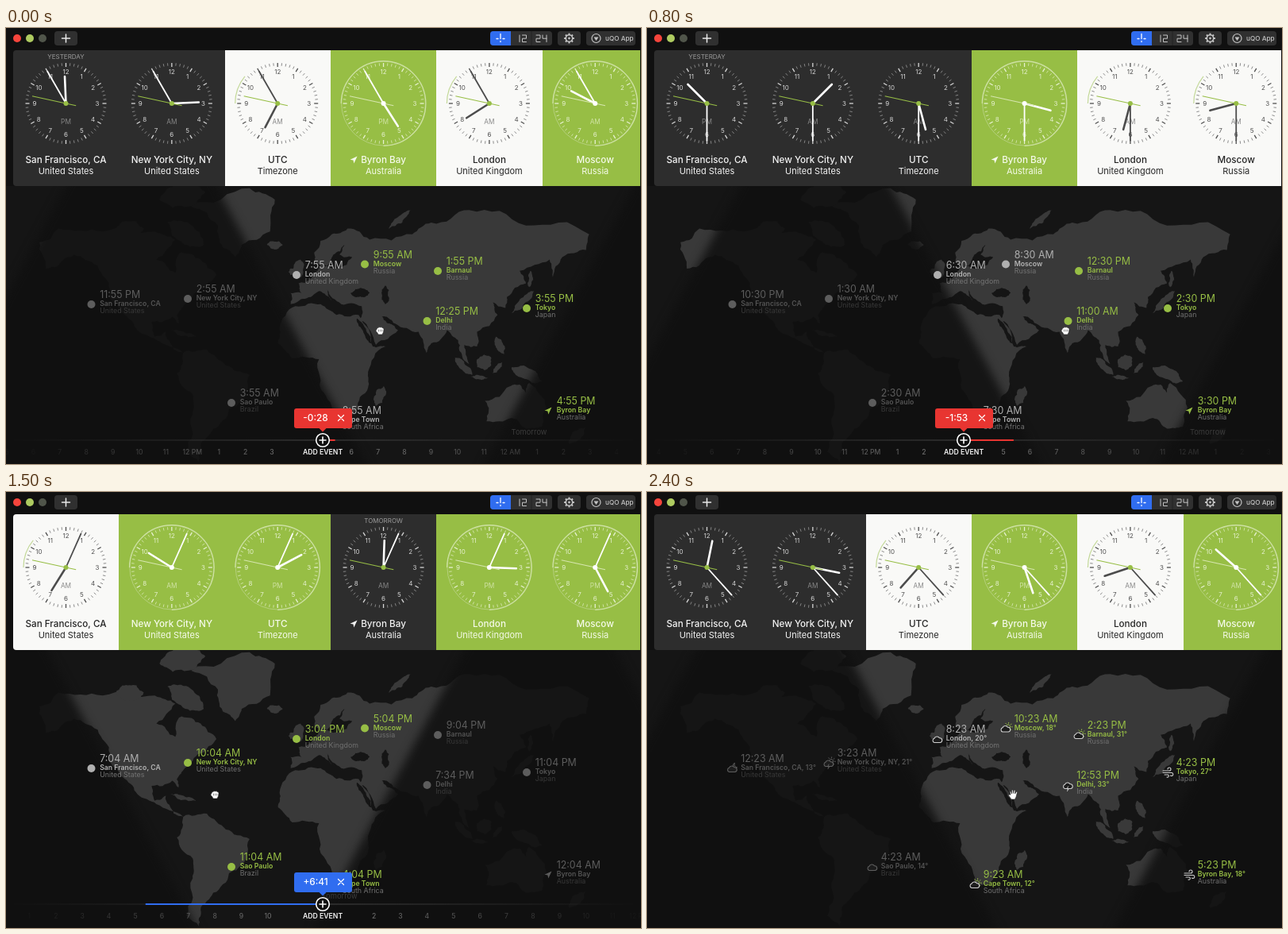
Animation of 800 by 549 pixels, one loop 3400 ms. Source, as an HTML page with a canvas:

```html
<!DOCTYPE html>
<html lang="en">
<head>
<meta charset="utf-8">
<title>World clock</title>
<style>
html, body { margin: 0; width: 100%; height: 100%; overflow: hidden; background: #101010; }
canvas { display: block; width: 800px; height: 549px; }
</style>
</head>
<body>
<canvas id="stage"></canvas>
<script>
const W = 800, H = 549, LOOP = 3400, STEP = 100, LAST = 24;
const GREEN = '#97be45', RED = '#e83531', BLUE = '#306df0';
const SEA = '#151515', LAND = '#393939', DARK = '#101010';
const NOW = 443;               // minutes UTC at zero offset
const HOUR_PX = 33.4;
const TAU = 2 * Math.PI;
const canvas = document.getElementById('stage');
const ctx = canvas.getContext('2d');
const dpr = window.devicePixelRatio || 1;
canvas.width = W * dpr;
canvas.height = H * dpr;

// Rough outlines as longitude,latitude; the coast detail is grown by fractal subdivision
const continents = {
  northAmerica: '-168,66 -156,71 -128,70 -95,70 -82,67 -94,59 -82,53 -78,62 -66,59 -56,52 -66,45 -76,37 -81,31 -80,26 -84,30 -97,27 -95,18 -88,21 -83,10 -77,8 -94,16 -106,22 -114,31 -124,42 -124,48 -135,58 -150,60 -164,55',
  southAmerica: '-77,8 -62,10 -50,0 -35,-6 -40,-22 -48,-27 -58,-38 -66,-47 -67,-55 -75,-50 -71,-30 -71,-18 -81,-5',
  greenland: '-72,78 -35,83 -19,80 -22,70 -40,65 -44,60 -52,64 -55,72',
  eurasia: '-9,37 -9,43 -2,43 -4,48 8,54 10,57 21,55 30,60 22,61 25,65 18,61 14,56 6,58 6,62 17,69 27,71 41,67 68,69 80,73 104,77 140,72 180,69 178,63 163,60 157,51 155,59 136,54 140,48 128,41 127,35 119,38 122,31 109,21 109,12 101,13 104,1 98,9 97,16 90,22 80,14 77,8 72,21 57,26 48,30 59,22 45,13 35,28 36,36 23,37 14,45 17,39 9,44 0,40',
  africa: '-6,36 10,37 20,31 34,31 43,12 51,12 40,-4 40,-14 33,-27 26,-34 18,-34 12,-17 9,4 -8,4.5 -17,14 -16,23',
  australia: '114,-22 130,-13 136,-12 140,-17 142,-11 153,-26 150,-37 140,-38 131,-32 115,-34'
};

// Long thin shapes: from, to, width in px
const islands = [
  '-5,50 -3,59 12', '-9,52 -7,55 8', '-24,65 -14,65 9', '53,71 67,77 6', '-120,71 -102,71 18', '-87,73 -64,65 22',
  '-92,80 -63,82 26', '95,5 106,-6 9', '109,-1 118,5 16', '105,-7 116,-8 4', '119,-5 125,2 6', '131,-1 150,-10 14',
  '121,18 126,7 9', '131,32 145,44 8', '142,46 143,54 5', '45,-25 50,-13 12', '167,-46 178,-37 9', '-85,22 -69,18 5'
];
const seas = ['29,43 41,43 10', '51,37 51,47 9', '33,29 43,13 6', '49,30 56,26 5'];

let seed = 11;
const random = () => (seed = seed * 16807 % 2147483647) / 2147483647;
const pairs = str => str.split(' ').map(p => p.split(',').map(Number));

// Miller projection
const project = ([lon, lat]) =>
  [376.5 + 1.99 * lon, 425 - 142.5 * Math.log(Math.tan(Math.PI / 4 + 0.4 * lat * Math.PI / 180))];

function addCoast(path, points) {
  const wander = ([ax, ay], [bx, by], depth) => {
    if (!depth) return path.lineTo(bx, by);
    const shift = (random() - 0.5) * 0.3;
    const mid = [(ax + bx) / 2 + (by - ay) * shift, (ay + by) / 2 - (bx - ax) * shift];
    wander([ax, ay], mid, depth - 1);
    wander(mid, [bx, by], depth - 1);
  };
  path.moveTo(...points[0]);
  points.forEach((p, i) => wander(p, points[(i + 1) % points.length], 3));
  path.closePath();
}
function addSpindle(path, str) {
  const [from, to, [width]] = pairs(str);
  const [ax, ay] = project(from), [bx, by] = project(to);
  const k = width / 2 / Math.hypot(bx - ax, by - ay);
  const side = (u, s) => [ax + (bx - ax) * u - (by - ay) * k * s, ay + (by - ay) * u + (bx - ax) * k * s];
  addCoast(path, [side(0, 0), side(0.25, 1), side(0.75, 1), side(1, 0), side(0.75, -1), side(0.25, -1)]);
}
const land = new Path2D(), water = new Path2D();
Object.values(continents).forEach(c => addCoast(land, pairs(c).map(project)));
const isles = islands.map(s => { const p = new Path2D(); addSpindle(p, s); return p; });
seas.forEach(s => addSpindle(water, s));

// name, country, UTC offset, x, y, temperature, weather
const places = [
  ['San Francisco, CA', 'United States', -420, 107.5, 348, 13, 'moon'],
  ['New York City, NY', 'United States', -240, 229, 341, 21, 'sun rain'],
  ['London', 'United Kingdom', 60, 366, 311, 20, ''],
  ['Moscow', 'Russia', 180, 452, 297.5, 18, 'sun'],
  ['Barnaul', 'Russia', 420, 544, 306, 31, 'sun'],
  ['Delhi', 'India', 330, 530.5, 369, 33, 'rain'],
  ['Tokyo', 'Japan', 540, 656, 353, 27, 'wind'],
  ['Sao Paulo', 'Brazil', -180, 284, 472, 14, ''],
  ['Cape Town', 'South Africa', 120, 413, 494, 12, 'sun'],
  ['Byron Bay', 'Australia', 600, 683, 482, 18, 'wind']
];
const clocks = [places[0], places[1], ['UTC', 'Timezone', 0], places[9], places[2], places[3]];

const themes = {
  night: { tile: '#2d2d2d', ink: '#f2f2f2', soft: '#d5d5d5', dim: '#858585', second: GREEN, pin: GREEN, hand: '#ffffff' },
  dawn: { tile: '#f9f9f7', ink: '#262626', soft: '#505050', dim: '#8c8c8c', second: GREEN, pin: GREEN, hand: '#4c4c4c' },
  day: { tile: GREEN, ink: '#f5faea', soft: '#e6f0cf', dim: '#cfe2a3', second: '#d6e6ae', pin: '#ffffff', hand: '#ffffff' }
};
const labels = {
  night: ['#5d5d5d', '#545454', '#383838'],
  dawn: ['#b0b0b0', '#b5b5b5', '#747474'],
  day: [GREEN, GREEN, '#707070']
};

// Drag: step, offset in minutes, pointer x
const drag = [[0, -28, 471], [2, -117, 514], [8, -113, 527], [11, 77, 433], [15, 401, 263], [20, 186, 360], [24, 0, 461]];

// Smooth curve through the drag points
function poseAt(step) {
  let i = 0;
  while (i < drag.length - 2 && drag[i + 1][0] <= step) i++;
  const slope = (n, k) => {
    const a = drag[n - 1], b = drag[n + 1];
    return a && b ? (b[k] - a[k]) / (b[0] - a[0]) : 0;
  };
  const a = drag[i], b = drag[i + 1], d = b[0] - a[0], u = (step - a[0]) / d;
  const s = u * u * (3 - 2 * u);
  return [1, 2].map(k => a[k] + (b[k] - a[k]) * s
    + d * (u * (1 - u) ** 2 * slope(i, k) - u * u * (1 - u) * slope(i + 1, k)));
}

const wrap = m => ((m % 1440) + 1440) % 1440;
const pad = n => String(n).padStart(2, '0');
const half = m => wrap(m) < 720 ? 'AM' : 'PM';
const clockText = m => `${Math.floor(wrap(m) / 60) % 12 || 12}:${pad(wrap(m) % 60)} ${half(m)}`;
const phase = m => {
  const h = wrap(m) / 60;
  return h >= 6 && h < 9 ? 'dawn' : h >= 9 && h < 18 ? 'day' : 'night';
};

function text(str, x, y, size, color, weight = 400, align = 'left') {
  ctx.font = `${weight} ${size}px Inter, sans-serif`;
  ctx.textAlign = align;
  ctx.textBaseline = 'middle';
  ctx.fillStyle = color;
  ctx.fillText(str, x, y);
}
function line(x1, y1, x2, y2, color, width = 1, cap = 'butt') {
  ctx.strokeStyle = color;
  ctx.lineWidth = width;
  ctx.lineCap = cap;
  ctx.beginPath();
  ctx.moveTo(x1, y1);
  ctx.lineTo(x2, y2);
  ctx.stroke();
}
function disc(x, y, r, color) {
  ctx.fillStyle = color;
  ctx.beginPath();
  ctx.arc(x, y, r, 0, TAU);
  ctx.fill();
}
function ring(x, y, r, color, width = 1, from = 0, to = TAU) {
  ctx.strokeStyle = color;
  ctx.lineWidth = width;
  ctx.beginPath();
  ctx.arc(x, y, r, from, to);
  ctx.stroke();
}
function box(x, y, w, h, r, color) {
  ctx.fillStyle = color;
  ctx.beginPath();
  ctx.roundRect(x, y, w, h, r);
  ctx.fill();
}
function shape(d, x, y, fill, stroke, width = 1) {
  const path = new Path2D(d);
  ctx.save();
  ctx.translate(x, y);
  ctx.lineCap = ctx.lineJoin = 'round';
  if (fill) { ctx.fillStyle = fill; ctx.fill(path); }
  if (stroke) { ctx.strokeStyle = stroke; ctx.lineWidth = width; ctx.stroke(path); }
  ctx.restore();
}
const polar = (x, y, turn, r) => [x + r * Math.sin(turn * TAU), y - r * Math.cos(turn * TAU)];
const arrow = (x, y, color) => shape('M4.5-4.5L-4.5-.3L-.6.6L.3 4.5Z', x, y, color);

function drawMap(utc) {
  ctx.fillStyle = SEA;
  ctx.fillRect(0, 190, W, H);
  ctx.fillStyle = LAND;
  ctx.fill(land);
  isles.forEach(p => ctx.fill(p));
  ctx.fillStyle = SEA;
  ctx.fill(water);

  // Night falls between the sloping edges of neighbouring days
  const span = 716, noon = 734.7 - 0.4975 * utc, top = 170, bottom = 580;
  const reach = y => 371 - 0.54 * y;
  ctx.save();
  ctx.filter = `blur(${6 * dpr}px)`;
  ctx.fillStyle = 'rgba(16,16,16,.88)';
  for (let k = -2; k < 2; k++) {
    const dusk = noon + k * span, dawn = dusk + span;
    ctx.beginPath();
    ctx.moveTo(dusk + reach(top), top);
    ctx.lineTo(dawn - reach(top), top);
    ctx.lineTo(dawn - reach(bottom), bottom);
    ctx.lineTo(dusk + reach(bottom), bottom);
    ctx.fill();
  }
  ctx.restore();
}

function drawWeather(kind, x, y, tone) {
  const ink = tone === 'night' ? '#5f5f5f' : '#d0d0d0';
  if (kind === 'wind') {
    shape('M-6-2H2A2 2 0 1 0 0-4M-6 0.5H5A2 2 0 1 1 3.5 4M-4 3H0A1.6 1.6 0 1 1-1 6', x, y, null, ink, 1.1);
    return;
  }
  if (kind.includes('sun')) {
    const glow = tone === 'day' ? GREEN : ink;
    ring(x + 3, y - 2, 2.6, glow, 1, -2.6, 1);
    for (let i = 0; i < 5; i++) {
      const turn = -0.1 + i * 0.12;
      line(...polar(x + 3, y - 2, turn, 4), ...polar(x + 3, y - 2, turn, 5.6), glow);
    }
  }
  if (kind === 'moon') shape('M1-3A4 4 0 0 1 3-7A4 4 0 0 0 6-1', x, y, null, ink);
  shape('M-4 4.5A2.7 2.7 0 0 1-4-.7A3.6 3.6 0 0 1 2.5-1.2A2.9 2.9 0 0 1 3.5 4.5Z', x, y, '#1d1d1d', ink, 1.1);
  if (kind.includes('rain')) shape('M0 2L-1.5 5H.5L-1 7.5', x, y, null, ink);
}

function drawPlace([name, country, zone, x, y, degrees, weather], utc, resting) {
  const m = utc + zone, tone = phase(m), [head, body, foot] = labels[tone];
  if (resting) drawWeather(weather, x, y, tone);
  else if (name === 'Byron Bay') arrow(x, y, head);
  else disc(x, y, 5, head);
  text(clockText(m), x + 10.7, y - 11.7, 12.4, head);
  text(resting ? `${name}, ${degrees}°` : name, x + 10.7, y - 0.3, 8.7, body, 600);
  text(country, x + 10.7, y + 8.5, 8.9, foot);
}

function drawClock([name, country, zone], i, utc) {
  const m = utc + zone, tone = phase(m), t = themes[tone];
  const edge = n => Math.min(799, Math.round(9 + n * 133.33));
  const x = 75.5 + i * 133.35, y = 95;
  box(edge(i), 28, edge(i + 1) - edge(i), 171, i ? 0 : [4, 0, 0, 4], t.tile);
  const day = Math.floor(m / 1440);
  if (day) text(day < 0 ? 'YESTERDAY' : 'TOMORROW', x, 36.5, 8, '#9b9b9b', 400, 'center');

  if (tone === 'dawn') ring(x, y, 53.5, '#c4d99a', 1.2, Math.PI, Math.PI * 1.22);
  if (tone === 'day') {
    ring(x, y, 53, '#b5d07c', 1);
    ring(x, y, 53.3, '#cfe2a5', 1.2, Math.PI, Math.PI * 2.5);
  }
  for (let k = 0; k < 60; k++) {
    const major = k % 5 === 0;
    line(...polar(x, y, k / 60, major ? 46 : 47.5), ...polar(x, y, k / 60, 51), major ? t.soft : t.dim, major ? 1.3 : 1);
  }
  for (let k = 1; k <= 12; k++) text(k, ...polar(x, y + 0.5, k / 12, 39.5), 8, t.soft, 400, 'center');
  text(half(m), x, 119, 8.3, t.dim, 400, 'center');

  line(x, y, ...polar(x, y, m / 720, 34), t.hand, 2.6, 'round');
  line(x, y, ...polar(x, y, m / 60, 46.5), t.hand, 1.8, 'round');
  line(...polar(x, y, 0.284, 13), ...polar(x, y, 0.784, 43.5), t.second, 1.1);
  disc(x, y, 3, t.pin);

  text(name, x, 166.5, 11.7, t.ink, 500, 'center');
  text(country, x, 180.5, 11, t.ink, 400, 'center');
  if (name === 'Byron Bay') arrow(x - 37.5, 166, t.ink);
}

function drawToolbar() {
  const icon = '#c4c4c4', button = '#303030';
  ['#f5453c', '#aecb60', '#50554a'].forEach((c, i) => disc(14 + 16 * i, 13, 5, c));
  box(61, 4, 29, 18, 4, button);
  shape('M-5 0H5M0-5V5', 75.5, 13, null, '#e8e8e8', 1.5);
  box(610, 4, 78, 18, 4, button);
  box(610, 4, 26, 18, [4, 0, 0, 4], BLUE);
  line(662, 4, 662, 22, '#222222');
  shape('M0-5V1M-5 1H-3M3 1H5M0 4V5', 623, 12.5, null, '#ffffff', 1.3);
  const two = 'M0 0H5V4.2H0V8.5H5';
  shape('M0 0V8.5', 647, 9, null, icon);
  shape(two, 650.5, 9, null, icon);
  shape(two, 668, 9, null, icon);
  shape('M0 0V4.2H5M5 0V8.5', 676, 9, null, icon);
  box(695, 4, 29, 18, 4, button);
  for (let k = 0; k < 8; k++) line(...polar(709.5, 13, k / 8, 4), ...polar(709.5, 13, k / 8, 6.4), icon, 2);
  ring(709.5, 13, 4.2, icon, 1.6);
  disc(709.5, 13, 1.4, icon);
  box(731, 4, 62, 18, 4, button);
  ring(743.5, 13, 5.5, icon, 1.2);
  shape('M-3-1.5H3L0 3Z', 743.5, 13, icon);
  text('uQO App', 755, 13.5, 8.2, icon, 500);
}

function drawTimeline(offset) {
  const home = (NOW + offset + 600) / 60;
  const xOf = h => 399 + (h - home) * HOUR_PX;
  const track = ctx.createLinearGradient(0, 0, W, 0);
  track.addColorStop(0, 'rgba(70,70,70,0)');
  track.addColorStop(0.5, '#464646');
  track.addColorStop(1, 'rgba(70,70,70,0)');
  line(10, 519, 790, 519, track);
  text('Tomorrow', xOf(24) + 1, 509.5, 9.4, '#3b3b3b');
  for (let h = Math.ceil(home - 12); h < home + 12; h++) {
    const x = xOf(h), gap = Math.abs(x - 399);
    if (gap < 36) continue;
    const hour = (h + 48) % 24;
    const word = hour % 12 || (hour ? '12 PM' : '12 AM');
    text(word, x, 534.5, 8.6, `rgba(140,140,140,${Math.max(0.06, 0.85 - gap / 460)})`, 500, 'center');
  }
  const color = offset < 0 ? RED : BLUE;
  line(399, 519, 399 - offset * HOUR_PX / 60, 519, color, 2);
  box(363, 479, 73, 25, 3, color);
  shape('M-5 0H5L0 5Z', 399, 503.5, color);
  const size = Math.abs(offset);
  text(`${offset < 0 ? '-' : '+'}${Math.floor(size / 60)}:${pad(size % 60)}`, 390, 491.5, 11.8, '#ffffff', 500, 'center');
  shape('M-3.5-3.5L3.5 3.5M3.5-3.5L-3.5 3.5', 422, 491, null, '#ffffff', 1.2);
  disc(399, 519, 9, DARK);
  ring(399, 519, 8.3, '#ffffff', 1.6);
  shape('M-4 0H4M0-4V4', 399, 519, null, '#ffffff', 1.6);
  text('ADD EVENT', 399, 534.5, 8.7, '#f2f2f2', 600, 'center');
}

function drawPointer(x, y, open) {
  const fist = 'M-4-2Q-4-4-2-3.5Q-1-5 .5-4Q2-5 3-3.5Q5-4 5-1.5Q5 2 3 5H-2Q-3 2-5 1Q-5-1-4-2Z';
  const palm = 'M-3 0L-4-4L-2.5-4L-1.5-1L-1.5-6L0-6L.5-1.5L1.5-6L3-5.5L2.5-1L4.5-4L5.5-3L4 3L2.5 6H-2L-5.5 1L-4.5 0Z';
  shape(open ? palm : fist, x, y, '#ffffff', '#202020', 0.6);
  if (!open) shape('M-1.5-1V1M.7-1V1M2.7-1V1', x, y, null, '#555555', 0.7);
}

function render(step) {
  const [rawOffset, pointerX] = poseAt(step);
  const offset = Math.round(rawOffset), utc = NOW + offset, resting = step === LAST;
  ctx.setTransform(dpr, 0, 0, dpr, 0, 0);
  drawMap(utc);
  places.forEach(p => drawPlace(p, utc, resting));
  if (!resting) drawTimeline(offset);
  drawPointer(pointerX, 381, resting);
  ctx.fillStyle = DARK;
  ctx.fillRect(0, 0, W, 199);
  drawToolbar();
  clocks.forEach((c, i) => drawClock(c, i, utc));
}

let shown = -1;
const start = performance.now();
function tick() {
  const step = Math.min(LAST, Math.floor(((performance.now() - start) % LOOP) / STEP));
  if (step !== shown) render(shown = step);
  requestAnimationFrame(tick);
}
tick();
</script>
</body>
</html>
```
